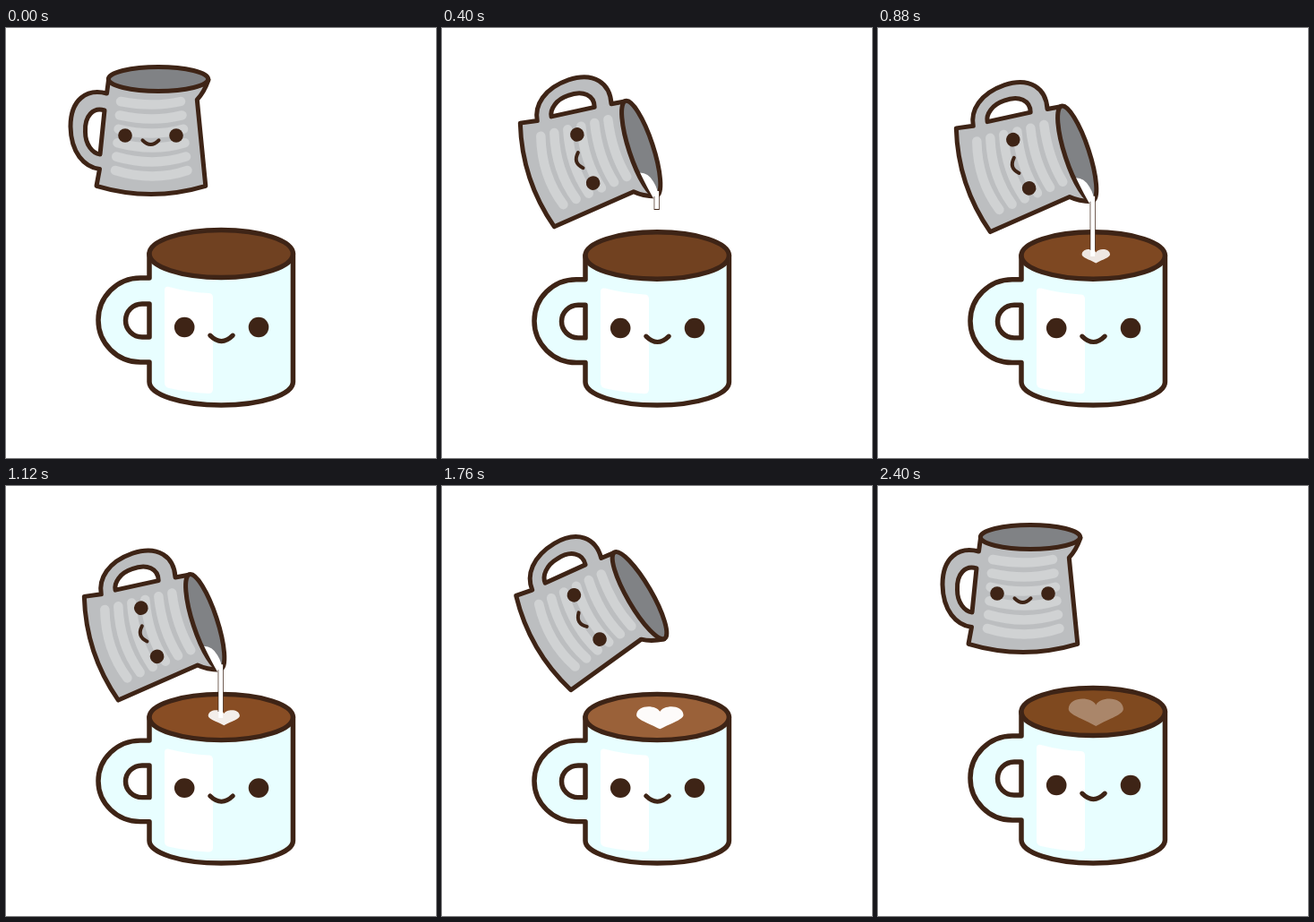
An HTML page that plays this animation: 480x480 px, repeating every 2480 ms.

```html
<!DOCTYPE html>
<html lang="en">
<head>
<meta charset="utf-8">
<title>Milk and coffee</title>
<style>
html, body { margin: 0; width: 100%; height: 100%; overflow: hidden; background: #fff; }
svg { display: block; width: 100%; height: 100%; }
.line { fill: none; stroke: #3e2416; stroke-linejoin: round; stroke-linecap: round; }
.dot { fill: #3e2416; }
.cup { stroke-width: 5.5; }
.jug { stroke-width: 5; }
.bands { fill: none; stroke: #d0d2d3; stroke-width: 10.5; stroke-linecap: round; }
</style>
</head>
<body>
<svg viewBox="0 0 480 480">
  <g id="cup">
    <path fill="#e8feff" d="M160 252V279H150A47 47 0 0 0 150 373H160V395A80.2 26 0 0 0 320.4 395V252Z"/>
    <path fill="#fff" d="M182 289Q204 295 226 296Q231 296 231 301V403Q231 408 226 408Q204 407 182 402Q177 401 177 396V293Q177 288 182 289Z"/>
    <path class="line cup" d="M160 252V279H150A47 47 0 0 0 150 373H160V395A80.2 26 0 0 0 320.4 395V252"/>
    <path class="line cup" style="fill:#fff" d="M160 308H152A18.5 18.5 0 0 0 152 345H160Z"/>
    <ellipse id="coffee" class="line cup" cx="240.2" cy="252" rx="80.2" ry="26.5"/>
    <path id="heart" fill="#fff" d="M0 -.27C-.15 -.58 -.97 -.6 -1 -.13C-1 .08 -.5 .22 0 .5C.5 .22 1 .08 1 -.13C.97 -.6 .15 -.58 0 -.27Z"/>
    <circle class="dot" cx="199.2" cy="334" r="11.3"/>
    <circle class="dot" cx="282" cy="334" r="11.3"/>
    <path class="line" stroke-width="5.2" d="M227.8 343.2Q240.5 356 253.2 343.2"/>
  </g>
  <g id="jug">
    <g transform="translate(-161.5 -120)">
      <path fill="#bcbec0" d="M113 73C90 67 72 80 72 110C72.5 139 87 155 104.5 157.5Z"/>
      <path fill="#bcbec0" d="M114.5 58L112.5 73L101 176.3Q162 194.5 222.8 176.3L213.3 80Q221 72 226 58Z"/>
      <path id="bands" class="bands"/>
      <path class="line jug" d="M114.5 58L112.5 73C90 67 72 80 72 110C72.5 139 87 155 104.5 157.5L101 176.3Q162 194.5 222.8 176.3L213.3 80Q221 72 226 58"/>
      <path class="line jug" style="fill:#fff" d="M110 92C97.5 88 87.5 98 88.5 116C88.5 130 96.5 140 105 141Z"/>
      <ellipse cx="170" cy="57" rx="55.7" ry="13.5" fill="#808285"/>
    </g>
    <ellipse class="line jug" cx="8.5" cy="-63" rx="55.7" ry="13.5"/>
    <path id="milk" fill="#fff" d="M34 -53.5Q37 -62 48 -64.5Q58 -67 66 -64L67 -59Q54 -56 34 -53.5Z"/>
    <circle class="dot" cx="-28.5" r="7.8"/>
    <circle class="dot" cx="28.5" r="7.8"/>
    <path class="line" stroke-width="4" d="M-9 5.3Q0 14.7 9 5.3"/>
  </g>
  <g id="stream">
    <path id="edge" stroke="#3e2416" stroke-width="6.2"/>
    <path id="flow" stroke="#fff" stroke-width="4.8"/>
  </g>
</svg>
<script>
const LOOP = 2480, STEP = 80, BEAT = 480, TILT = 71.8;
const POUR = 400, BACK = 1680, REST = 2160;
const COFFEE = [
  [0, 112, 65, 33], [560, 113, 65, 32], [1120, 136, 77, 36], [1520, 146, 90, 50],
  [2000, 161, 104, 64], [2240, 161, 104, 64], [LOOP, 110, 57, 14]
];
const HEART = [
  [480, 10, 0.8], [640, 13.8, 0.84], [1120, 17.6, 0.9], [1520, 21.8, 0.95],
  [2000, 30.6, 1], [2240, 30.6, 1], [LOOP, 30.6, 0]
];

const el = id => document.getElementById(id);
const set = (id, name, value) => el(id).setAttribute(name, value);
const show = (id, on) => set(id, "visibility", on ? "visible" : "hidden");
const mix = (a, b, p) => a + (b - a) * p;

// Linear interpolation over rows of [time, ...values]
function track(rows, t) {
  let i = 0;
  while (i < rows.length - 2 && t >= rows[i + 1][0]) i++;
  const a = rows[i], b = rows[i + 1];
  const p = Math.max(0, (t - a[0]) / (b[0] - a[0]));
  return a.slice(1).map((v, k) => mix(v, b[k + 1], p));
}

const bob = t => 157.5 + 11.5 * Math.cos(2 * Math.PI * (t / BEAT - 1 / 6));

function jugPose(t) {
  let p = 1, y;
  if (t <= POUR) {
    p = t / POUR;
    y = mix(120, 146, p);
  } else if (t < BACK) {
    y = bob(t);
  } else {
    p = Math.max(0, (REST - t) / (REST - BACK));
    y = mix(120, bob(BACK), p);
  }
  const x = mix(161.5, 159.7, p) + 3.5 * Math.sin(Math.PI * p);
  return { x, y, angle: TILT * p };
}

function draw(t) {
  const squash = 1 - 0.0473 * (1 - Math.cos(2 * Math.PI * t / BEAT)) / 2;
  set("cup", "transform", `translate(0 ${421 * (1 - squash)}) scale(1 ${squash})`);
  el("coffee").style.fill = `rgb(${track(COFFEE, t).map(Math.round)})`;

  const [size, alpha] = track(HEART, t);
  show("heart", t >= 560);
  set("heart", "transform", `translate(243.3 252.7) scale(${size})`);
  set("heart", "opacity", alpha);

  const { x, y, angle } = jugPose(t);
  set("jug", "transform", `translate(${x} ${y}) rotate(${angle})`);
  show("milk", t >= 320 && t <= BACK);

  const surface = 421 - 168 * squash;
  const top = t <= BACK ? y + 36 : bob(BACK) + 36 + (t - BACK) * 0.9;
  const end = Math.min(surface, 202 + (t - POUR) * 0.4);
  show("stream", t >= POUR && top < end);
  // The outline stops short of the heart
  set("edge", "d", `M239.7 ${top + 6}V${Math.min(end + 1, surface - 7)}`);
  set("flow", "d", `M239.7 ${top}V${end}`);
}

let bands = "";
for (let i = 0; i < 6; i++) {
  const y = 82 + 15.4 * i;
  bands += `M${128 - 1.2 * i} ${y}Q164 ${y + 7 + 1.2 * i} ${195 + 1.5 * i} ${y}`;
}
set("bands", "d", bands);

const start = performance.now();
function tick() {
  const t = (performance.now() - start) % LOOP;
  draw(Math.floor(t / STEP) * STEP);
  requestAnimationFrame(tick);
}
tick();
</script>
</body>
</html>
```
